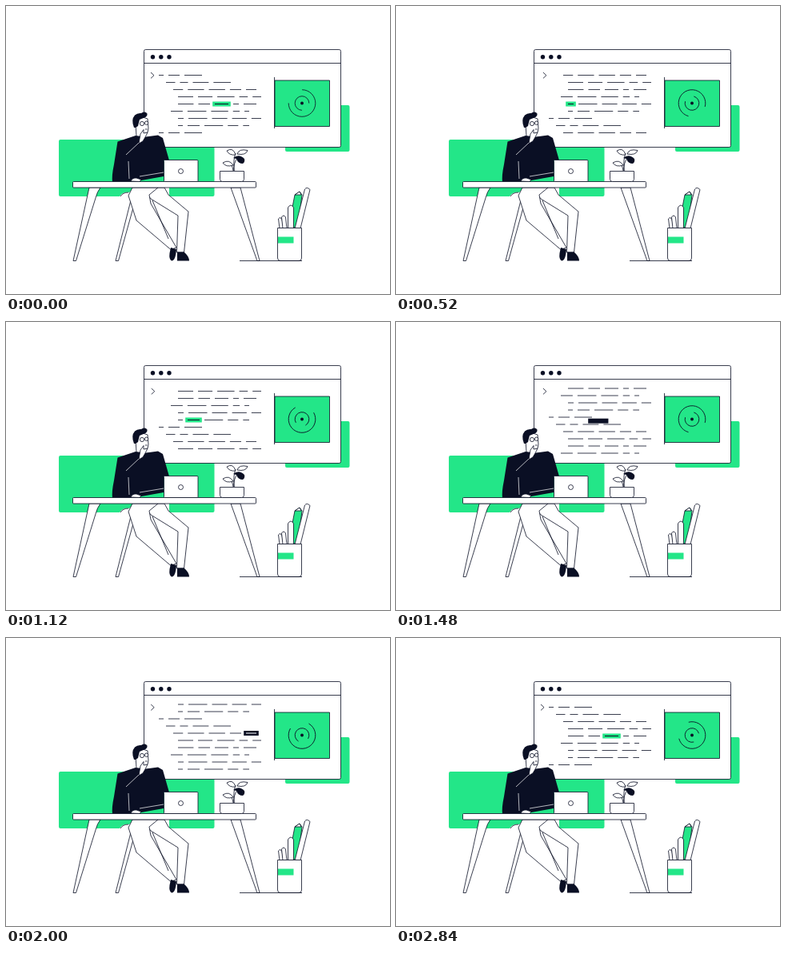
An HTML page for the animation above (2880 ms loop, 480 by 360 pixels).

```html
<!DOCTYPE html>
<html lang="en">
<head>
<meta charset="utf-8">
<title>Developer at a desk</title>
<style>
html, body { margin: 0; width: 100%; height: 100%; overflow: hidden; background: #fff; }
svg { display: block; width: 100vw; height: 100vh; }
.line, .paper, .edge { stroke: #0a0f24; stroke-width: .8; stroke-linejoin: round; }
.line { fill: none; }
.paper { fill: #fff; }
.ink { fill: #0a0f24; }
.green { fill: #23e688; }
</style>
</head>
<body>
<svg viewBox="0 0 480 360">
  <defs><clipPath id="view"><rect x="173" y="78" width="160" height="88"/></clipPath></defs>

  <rect class="green" x="66" y="167" width="194.5" height="71" rx="2"/>
  <rect class="green" x="349" y="124" width="80.5" height="58" rx="2"/>

  <g id="window">
    <rect class="paper" x="172.5" y="54.5" width="246" height="122" rx="2"/>
    <path class="line" d="M172.5 71.5H418.5"/>
    <g class="ink"><circle cx="183.5" cy="63.7" r="2.7"/><circle cx="193.8" cy="63.7" r="2.7"/><circle cx="204" cy="63.7" r="2.7"/></g>
    <path id="prompt" class="line" d="M181 83L185 86.7L181 90.4"/>
    <g clip-path="url(#view)">
      <path id="code" class="line"/>
      <rect id="bar" height="6"/>
      <path id="word" fill="none"/>
    </g>
    <rect class="green edge" x="336" y="93" width="68.5" height="57.5"/>
    <path class="line" d="M335.5 89V153"/>
    <circle class="ink" cx="370" cy="121.5" r="2"/>
    <path id="rings" class="line" d="M370 104.7A16.8 16.8 0 1 1 353.2 121.5M378.8 121.5A8.8 8.8 0 1 0 370 130.3"/>
  </g>

  <g id="table-legs" class="paper">
    <path d="M104 227L84 318.5H87.5L112 240Q114 232 118 227Z"/>
    <path d="M160 227L137 318.5H140.5L166 227Z"/>
    <path d="M281 227L314 318.5H317L293 227Z"/>
  </g>

  <g id="person">
    <path fill="#fff" d="M142 238Q146 232 154 233L160 227H204V238Z"/>
    <path class="line" d="M143 238Q146 233 153 233"/>
    <path class="paper" d="M170 227H198L203 236L228 257L222.5 308H213.5L215 262L181 241Z"/>
    <path class="paper" d="M158 227L153 237L163 268L206 304.5L213 302L181 247L179 236L190 227Z"/>
    <path class="line" d="M183 243L203 291"/>
    <path class="ink" d="M206 302L213 304Q212 318.5 207 318.5Q203.5 317 204.5 309Z"/>
    <path class="ink" d="M214 307.5H222.5Q229 313 229 318.5H214Z"/>

    <path class="paper" d="M162 147L163 163H172L177 158L178 153L177 141L168 138Z"/>
    <path class="ink" d="M160 152Q156 142 161 136.500Q164 133.500 169 134Q174 131 176.500 134.500Q177 138 173 139.500L167 142L165 150L162 152Z"/>
    <circle class="paper" cx="170" cy="147" r="2.600"/>
    <circle class="paper" cx="175.600" cy="146.200" r="2.200"/>
    <path class="line" d="M174 154H176.500"/>
    <path class="ink" d="M139.500 169.500L162 162L171 164L190 161.500L196 165L204 193H197V213L169 218L164 220H133Q132 212 135 198Z"/>
    <path class="paper" d="M166 172L168 160L172 154.500L172 159L177 158L174 164L171 169Z"/>
    <path d="M150 186L166 171M153 194L154 216M167 213L197 208" fill="none" stroke="#fff" stroke-width=".7"/>
    <path class="paper" d="M156 219Q158 214.500 163 215L169 217L167 219.500Z"/>
  </g>

  <rect class="paper" x="83.500" y="219.500" width="229" height="7.500" rx="1"/>
  <rect class="paper" x="197.500" y="192.500" width="42.500" height="27" rx="1"/>
  <circle class="paper" cx="218.500" cy="206.500" r="3"/>

  <g id="plant">
    <path class="line" d="M285 206Q284 196 290 189M285 206Q284 191 287 184M284 206Q283 198 278 196"/>
    <path class="paper" d="M287 186Q279 187 276 181Q284 176 287 186Z"/>
    <path class="paper" d="M289 185Q291 178 302 180.500Q300 187 289 185Z"/>
    <path class="paper" d="M284 199Q275 202 271 196Q279 191 284 199Z"/>
    <path class="ink" d="M284 190Q291 184 298 191Q299 195 296 197Q290 197 288 191Z"/>
    <path class="paper" d="M267.500 206.500H297.500V216.500Q297.500 219.500 294.500 219.500H270.500Q267.500 219.500 267.500 216.500Z"/>
  </g>

  <g id="cup">
    <path class="green edge" d="M353 277L361 236L367 232L370 236L365 277Z"/>
    <path class="paper" d="M361 236L367 232L369 236Z"/>
    <path class="paper" d="M361 278L373.500 229Q376 225.500 380 229.500L368 278Z"/>
    <path class="paper" d="M352.500 278V252Q356 246 359.500 252V278Z"/>
    <path class="paper" d="M342 278L340.500 266Q343 263 345 267L347 278Z"/>
    <path class="paper" d="M346 278L344.500 264Q347 260 349.500 264L351 278Z"/>
    <path class="paper" d="M339.500 277.500H369.500V315Q369.500 318.500 366 318.500H343Q339.500 318.500 339.500 315Z"/>
    <rect class="green" x="340" y="288.500" width="19.500" height="8"/>
    <path class="line" d="M292 318.500H370"/>
  </g>
</svg>

<script>
const LOOP = 2880, PITCH = 9, TOP = 86.5, ROWS = 8, GAP = 6, PAD = 2.8;
const INK = '#0a0f24', GREEN = '#23e688';

// Left and right ends of the repeating lines of code
const lefts = [191, 200, 209, 215, 215, 206, 215, 215];
const rights = [245, 281, 313, 319, 313, 304, 319, 304];

// Words the selection jumps to, and when it sets off
const stops = [
  { at: 60, row: 6, x: 215, w: 7 },
  { at: 600, row: 7, x: 227, w: 15 },
  { at: 1125, row: 8, x: 223, w: 22 },
  { at: 1301, row: 10, x: 300, w: 13 },
  { at: 2290, row: 12, x: 261, w: 17 }
];
const last = stops[stops.length - 1];
stops.unshift({ ...last, at: last.at - LOOP, row: last.row - ROWS });

const el = id => document.getElementById(id);
const set = (id, attrs) => Object.entries(attrs).forEach(([k, v]) => el(id).setAttribute(k, v));
const mix = (a, b, k) => a + (b - a) * k;
const ramp = (t, a, b) => Math.min(1, Math.max(0, (t - a) / (b - a)));

let seed = 7;
const random = () => (seed = seed * 16807 % 2147483647) / 2147483647;

function backInOut(u) {
  const c = 2.595;
  const f = v => v * v * ((c + 1) * v - c) / 2;
  return u < .5 ? f(2 * u) : 1 - f(2 - 2 * u);
}

// Words of random length between two ends
function dashes(x, end, y) {
  let d = '';
  while (x < end) {
    let w = 6 + 19 * random();
    if (x + w + GAP + 5 > end) w = end - x;
    d += `M${x} ${y}h${w}`;
    x += w + GAP;
  }
  return d;
}

function codeLine(r) {
  const y = r * PITCH, stop = stops.find(s => s.row % ROWS === r);
  if (!stop) return dashes(lefts[r], rights[r], y);
  const { x, w } = stop;
  return dashes(lefts[r], x - GAP, y) + `M${x} ${y}h${w}` + dashes(x + w + GAP, rights[r], y);
}

const lines = lefts.map((_, r) => codeLine(r)).join('');
const shift = n => lines.replace(/M(\S+) (\d+)/g, (_, x, y) => `M${x} ${+y + TOP + n * ROWS * PITCH}`);
set('code', { d: shift(0) + shift(1) + shift(2) });

const scrollAt = t => PITCH * (2 * ramp(t, 60, 480) + ramp(t, 620, 980) + 5 * ramp(t, 1120, 2420));

function drawBar(t, scroll) {
  let i = stops.length - 1;
  while (stops[i].at > t) i--;
  const to = stops[i], from = stops[i - 1] || to, next = stops[i + 1];
  const length = Math.min(400, next ? next.at - to.at : 400);
  const u = ramp(t, to.at, to.at + length), k = backInOut(u);
  const x = mix(from.x, to.x, k), w = mix(from.w, to.w, k);
  const y = TOP + PITCH * mix(from.row, to.row, k) - scroll;
  const dark = u < 1 || (t > 1125 && t < 2690);

  set('bar', { x: x - PAD, y: y - 3, width: w + 2 * PAD, fill: dark ? INK : GREEN });
  set('word', { d: u < 1 ? '' : `M${x} ${y}h${w}`, stroke: dark ? '#fff' : INK });
}

function draw(now) {
  const t = now % LOOP, turn = 3 * t / LOOP;
  const scroll = scrollAt(t);
  set('code', { transform: `translate(0 ${-scroll})` });
  drawBar(t, scroll);
  set('prompt', { transform: `translate(${1.5 * (1 - Math.cos(2 * Math.PI * turn))} 0)` });
  set('rings', { transform: `rotate(${360 * turn} 370 121.5)` });
}

function tick(now) {
  draw(now);
  requestAnimationFrame(tick);
}
draw(0);
requestAnimationFrame(tick);
</script>
</body>
</html>
```
